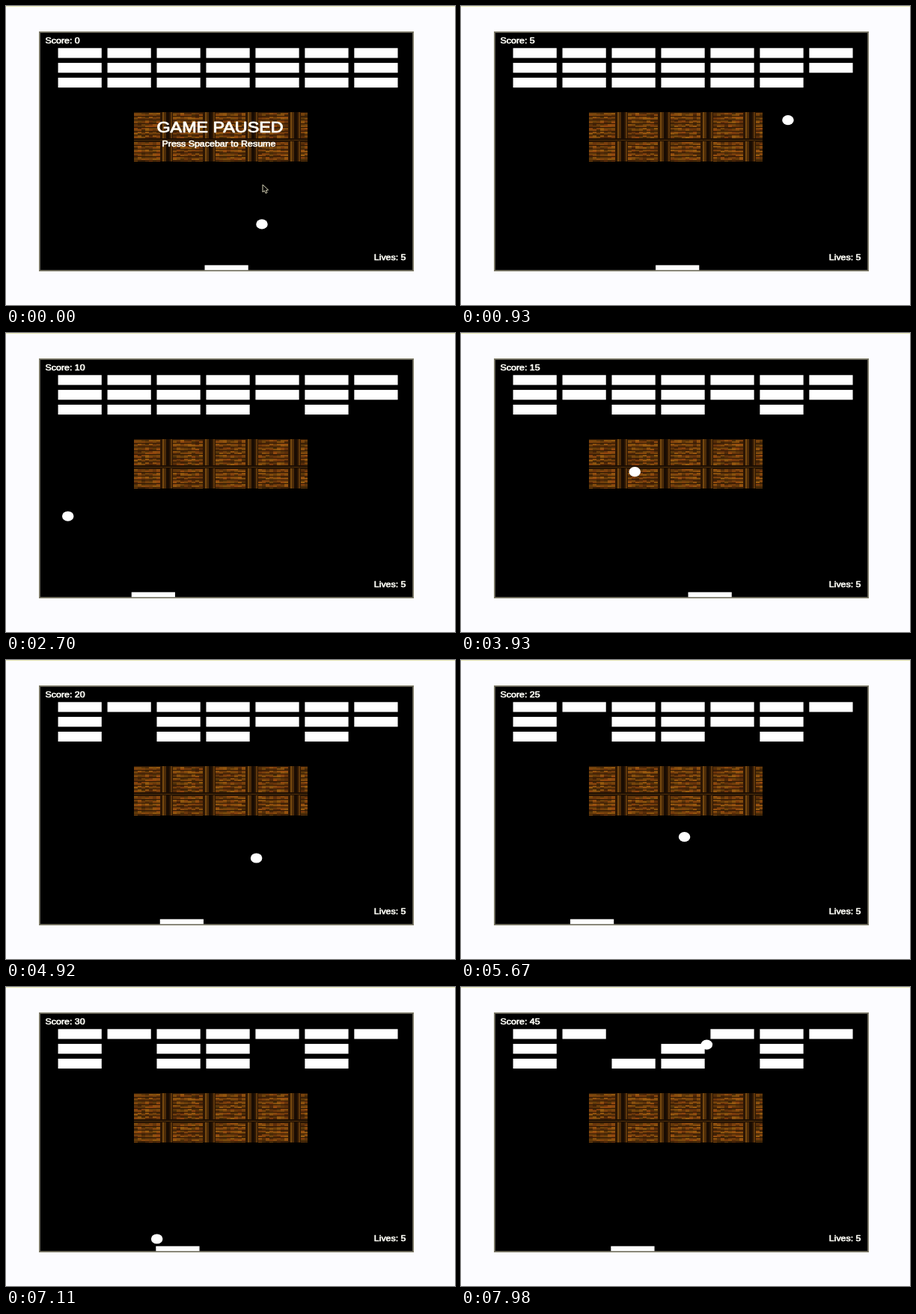
An HTML page with a canvas that plays this animation: 600 by 400 pixels, repeating every 8 s.

```html
<!DOCTYPE html>
<html lang="en">
<head>
<meta charset="utf-8">
<title>Brick game</title>
<style>
  html, body { margin: 0; width: 100%; height: 100%; overflow: hidden; background: #fcfcff; }
  canvas { display: block; }
</style>
</head>
<body>
<canvas id="stage" width="600" height="400"></canvas>
<script>
const ctx = document.getElementById('stage').getContext('2d');
const LOOP = 8000, STEP = 30, RESUME = 414;

// Playfield units: 640 x 480, shown squeezed inside the stage
const RADIUS = 10, LEFT = RADIUS, RIGHT = 640 - RADIUS;
const PADDLE_W = 75, PADDLE_Y = 470, PADDLE_STEP = 7;
const BALL_SPEED = 0.626; // vertical units per ms
const brickX = col => 30 + col * 85;
const brickY = row => 30 + row * 30;

// Stops of the ball. With a wall given, x is mirrored behind it, so that
// a straight line folded back at the wall makes the bounce.
const mirror = (x, wall) => wall ? 2 * wall - x : x;
const fold = x => x > RIGHT ? mirror(x, RIGHT) : x < LEFT ? mirror(x, LEFT) : x;
const at = (x, y, wall) => ({ x: mirror(x, wall), y });
const paddle = (x, wall) => at(x, PADDLE_Y - RADIUS, wall);
const ceiling = (x, wall) => at(x, RADIUS, wall);
const below = (row, col, offset, wall) =>
  ({ ...at(brickX(col) + offset, brickY(row) + 20 + RADIUS, wall), row, col });
const onTop = (row, col, offset) => ({ ...at(brickX(col) + offset, brickY(row)), row, col });

const stops = [
  at(381, 387),
  below(2, 6, 26, RIGHT), paddle(186),
  below(2, 4, 74), paddle(177),
  below(2, 1, 35, LEFT), paddle(430),
  below(1, 1, 14), paddle(235, LEFT),
  below(1, 6, 41, RIGHT), paddle(137),
  below(1, 4, 22), paddle(205),
  below(1, 2, -7, LEFT), below(0, 2, 24), ceiling(275),
  onTop(0, 3, 15), ceiling(322), at(363.5, 61.5)
];
stops.forEach((stop, i) => {
  const previous = stops[i - 1];
  stop.time = previous ? previous.time + Math.abs(stop.y - previous.y) / BALL_SPEED : RESUME;
});

// The player's moves: time and centre of the paddle
const moves = [
  [900, 320], [1350, 187], [1710, 376], [2400, 194], [3260, 194], [3510, 432],
  [3930, 369], [4400, 243], [4980, 243], [5850, 145], [6330, 257], [7100, 236]
].map(([time, x]) => ({ time, x }));

const mix = (a, b, k) => a + (b - a) * k;

// Neighbouring points around a time and the progress between them
function segment(points, t) {
  const next = points.findIndex(p => p.time > t);
  if (next === 0) return [points[0], points[0], 0];
  if (next < 0) return [points.at(-1), points.at(-1), 0];
  const a = points[next - 1], b = points[next];
  return [a, b, (t - a.time) / (b.time - a.time)];
}

function ballAt(t) {
  const [a, b, k] = segment(stops, t);
  return { x: fold(mix(fold(a.x), b.x, k)), y: mix(a.y, b.y, k) };
}

function paddleAt(t) {
  const [a, b, k] = segment(moves, t);
  const shift = mix(a.x, b.x, k) - 320;
  return 320 - PADDLE_W / 2 + PADDLE_STEP * Math.round(shift / PADDLE_STEP);
}

function rect(color, x, y, w, h) {
  ctx.fillStyle = color;
  ctx.fillRect(x, y, w, h);
}

function label(text, x, y, size = 16) {
  ctx.font = `${size}px Arial, "Liberation Sans", sans-serif`;
  ctx.fillStyle = ctx.strokeStyle = '#fffff8';
  ctx.lineWidth = 0.5 + size / 40;
  ctx.lineJoin = 'round';
  ctx.fillText(text, x, y);
  ctx.strokeText(text, x, y);
}

// Crates of wooden planks, in stage pixels
function drawWood() {
  let seed = 7;
  const random = () => (seed = seed * 16807 % 2147483647) / 2147483647;
  const plank = () => `hsl(${25 + random() * 9}, 82%, ${16 + random() * 17}%)`;
  ctx.save();
  ctx.beginPath();
  ctx.rect(171, 142, 232, 66);
  ctx.clip();
  rect('#2c1604', 171, 142, 232, 66);
  for (const top of [142, 181]) {
    for (let left = 160; left < 403; left += 57) {
      for (let y = top + 1; y < top + 35; y += 5) {
        for (let x = left + 6; x < left + 46; x += 5) {
          rect(plank(), x, y, 5, 2);
          rect(plank(), x, y + 2, 5, 2);
        }
      }
      rect('#75480f', left + 49, top, 2, 37);
      rect('#4c2b08', left + 51, top, 3, 37);
      rect('#180c03', left + 54, top, 4, 37);
      rect('#5e370b', left + 60, top, 2, 37);
    }
  }
  rect('#1c0e03', 171, 177, 232, 4);
  rect('#4f2f0a', 171, 179, 232, 1);
  ctx.restore();
}

function drawCursor() {
  ctx.save();
  ctx.translate(343, 239);
  ctx.fillStyle = '#000';
  ctx.strokeStyle = '#d8d4b8';
  const arrow = new Path2D('M0 0V10L2.5 8L4 11.5L6 10.5L4.5 7.5L7.5 7Z');
  ctx.fill(arrow);
  ctx.stroke(arrow);
  ctx.restore();
}

function drawBricks(broken) {
  for (let row = 0; row < 3; row++) {
    for (let col = 0; col < 7; col++) {
      if (broken.some(b => b.row === row && b.col === col)) continue;
      rect('#fff', brickX(col), brickY(row), 75, 20);
    }
  }
}

function drawBall({ x, y }) {
  ctx.beginPath();
  ctx.arc(x, y, RADIUS, 0, Math.PI * 2);
  ctx.fillStyle = '#fff';
  ctx.fill();
}

function draw(t) {
  const paused = t < RESUME;
  const broken = stops.filter(stop => 'row' in stop && stop.time <= t);

  rect('#fcfcff', 0, 0, 600, 400);
  rect('#e6e6b4', 0, 0, 600, 1);
  rect('#807d68', 44, 34, 501, 321);
  rect('#66645a', 45, 35, 499, 319);
  rect('#000', 46, 36, 497, 317);
  drawWood();

  ctx.save();
  ctx.translate(46.3, 36.5);
  ctx.scale(0.776, 0.66);
  drawBricks(broken);
  rect('#fff', paddleAt(t), PADDLE_Y, PADDLE_W, 10);
  label(`Score: ${broken.length * 5}`, 8, 20);
  label('Lives: 5', 574, 460);
  if (paused) {
    label('GAME PAUSED', 200, 200, 30);
    label('Press Spacebar to Resume', 209, 230);
  }
  drawBall(ballAt(t));
  ctx.restore();

  if (paused) drawCursor();
}

const start = performance.now();
function tick() {
  const t = (performance.now() - start) % LOOP;
  draw(Math.floor(t / STEP) * STEP);
  requestAnimationFrame(tick);
}
tick();
</script>
</body>
</html>
```
